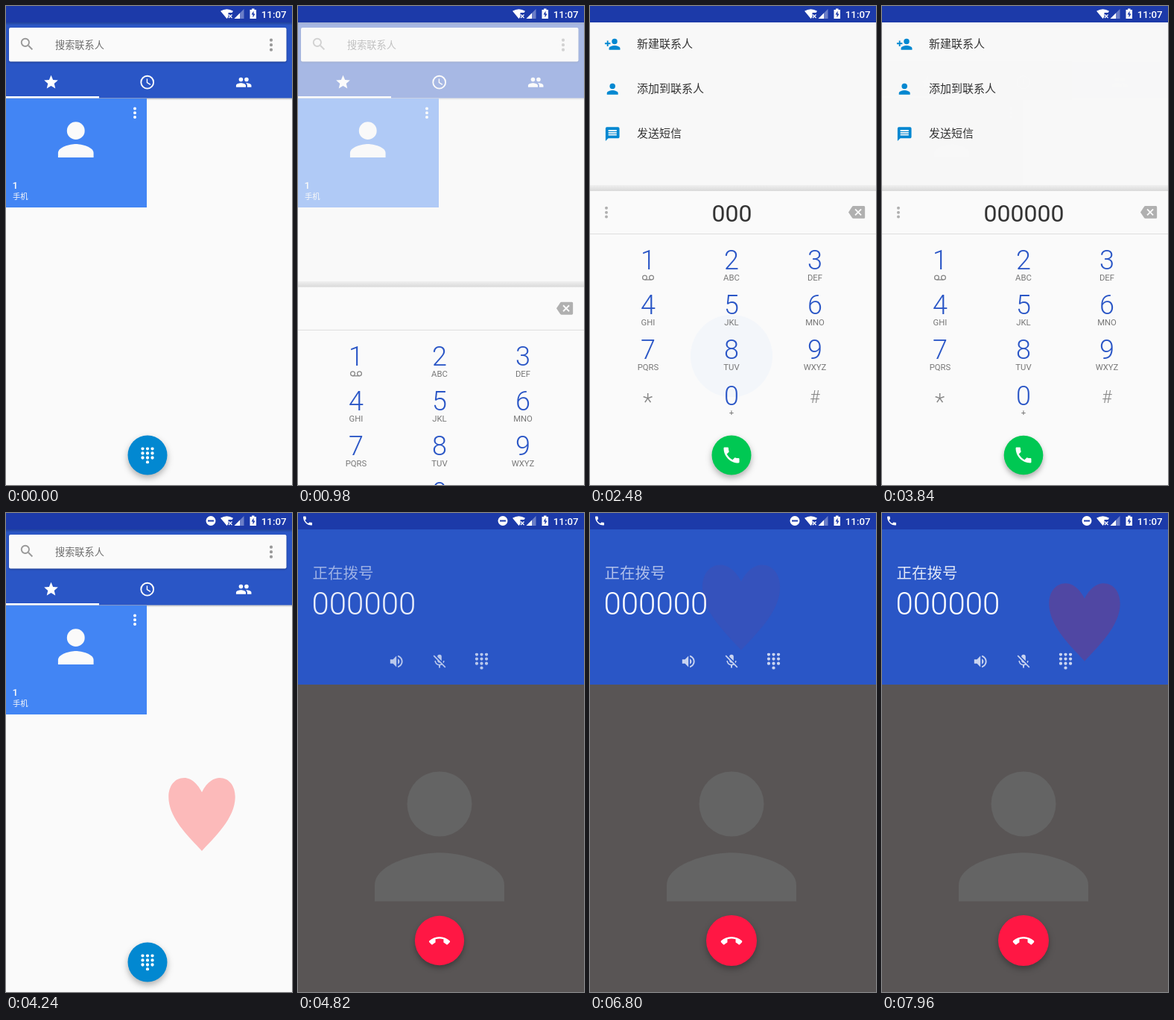
Animation of 384x642 px, one loop 8000 ms. Source, as an HTML page:

```html
<!DOCTYPE html>
<html lang="zh">
<head>
<meta charset="utf-8">
<title>Dialer</title>
<style>
html, body { margin: 0; width: 100%; height: 100%; overflow: hidden; background: #fafafa; }
svg.stage { display: block; width: 100vw; height: 100vh; }
text { font-family: Roboto, "Noto Sans CJK SC", "Noto Sans CJK", sans-serif; }
.mid { text-anchor: middle; }
.light { font-weight: 300; }
.lift { filter: drop-shadow(0 4px 4px rgba(0,0,0,.3)); }
</style>
</head>
<body>
<svg class="stage" viewBox="0 0 384 642">
<defs>
  <symbol id="star" viewBox="0 0 24 24"><path d="M12 17.27L18.18 21l-1.64-7.03L22 9.24l-7.19-.61L12 2 9.19 8.63 2 9.24l5.46 4.73L5.82 21z"/></symbol>
  <symbol id="clock" viewBox="0 0 24 24"><circle cx="12" cy="12" r="9" fill="none" stroke="#fff" stroke-width="2"/><path d="M11.7 7v5.5l4.8 2.9" fill="none" stroke="#fff" stroke-width="1.5"/></symbol>
  <symbol id="people" viewBox="0 0 24 24"><circle cx="8" cy="8" r="3"/><path d="M16 11a3 3 0 1 0 0-6 3 3 0 0 0 0 6zM8 13c-2.33 0-7 1.17-7 3.5V19h14v-2.5c0-2.33-4.67-3.5-7-3.5zm8 0c-.29 0-.62.02-.97.05 1.16.84 1.97 1.97 1.97 3.45V19h6v-2.5c0-2.33-4.67-3.5-7-3.5z"/></symbol>
  <symbol id="person" viewBox="0 0 24 24"><circle cx="12" cy="8" r="4"/><path d="M12 14c-2.67 0-8 1.34-8 4v2h16v-2c0-2.66-5.33-4-8-4z"/></symbol>
  <symbol id="add" viewBox="0 0 24 24"><circle cx="15" cy="8" r="4"/><path d="M6 10V7H4v3H1v2h3v3h2v-3h3v-2H6zm9 4c-2.67 0-8 1.34-8 4v2h16v-2c0-2.66-5.33-4-8-4z"/></symbol>
  <symbol id="chat" viewBox="0 0 24 24"><path d="M20 2H4c-1.1 0-2 .9-2 2v18l4-4h14c1.1 0 2-.9 2-2V4c0-1.1-.9-2-2-2zM6 9h12v2H6V9zm12 5H6v-2h12v2zm0-6H6V6h12v2z"/></symbol>
  <symbol id="call" viewBox="0 0 24 24"><path d="M6.62 10.79c1.44 2.83 3.76 5.14 6.59 6.59l2.2-2.2c.27-.27.67-.36 1.02-.24 1.12.37 2.33.57 3.57.57.55 0 1 .45 1 1V20c0 .55-.45 1-1 1-9.39 0-17-7.61-17-17 0-.55.45-1 1-1h3.5c.55 0 1 .45 1 1 0 1.25.2 2.45.57 3.57.11.35.03.74-.25 1.02l-2.2 2.2z"/></symbol>
  <symbol id="hangup" viewBox="0 0 24 24"><path d="M12 9c-1.6 0-3.15.25-4.6.72v3.1c0 .39-.23.74-.56.9-.98.49-1.87 1.12-2.66 1.85-.4.37-1 .37-1.41 0L.29 13.08c-.39-.39-.39-1.02 0-1.41C3.34 8.78 7.46 7 12 7s8.66 1.78 11.71 4.67c.39.39.39 1.02 0 1.42l-2.48 2.48c-.41.37-1 .37-1.41 0-.79-.74-1.69-1.36-2.67-1.85-.33-.16-.56-.5-.56-.9v-3.1C15.15 9.25 13.6 9 12 9z"/></symbol>
  <symbol id="erase" viewBox="0 0 24 24"><path d="M22 3H7c-.69 0-1.23.35-1.59.88L0 12l5.41 8.11c.36.53.9.89 1.59.89h15c1.1 0 2-.9 2-2V5c0-1.1-.9-2-2-2z"/><path d="M9.7 7.7l8.6 8.6m0-8.6l-8.6 8.6" stroke="#fafafa" stroke-width="2"/></symbol>
  <symbol id="sound" viewBox="0 0 24 24"><path d="M3 9v6h4l5 5V4L7 9H3zm13.5 3c0-1.77-1.02-3.29-2.5-4.03v8.05c1.48-.73 2.5-2.25 2.5-4.02zM14 3.23v2.06c2.89.86 5 3.54 5 6.71s-2.11 5.85-5 6.71v2.06c4.01-.91 7-4.49 7-8.77s-2.99-7.86-7-8.77z"/></symbol>
  <symbol id="mute" viewBox="0 0 24 24"><path d="M19 11h-1.7c0 .74-.16 1.43-.43 2.05l1.23 1.23c.56-.98.9-2.09.9-3.28zm-4.02.17L15 5a3 3 0 0 0-6 0v.18zM4.27 3L3 4.27l6.01 6.01V11c0 1.66 1.33 3 2.99 3l.65-.08 1.66 1.66c-.71.33-1.5.52-2.31.52-2.76 0-5.3-2.1-5.3-5.1H5c0 3.41 2.72 6.23 6 6.72V21h2v-3.28c.91-.13 1.77-.45 2.54-.9L19.73 21 21 19.73z"/></symbol>
  <symbol id="search" viewBox="0 0 24 24"><circle cx="9.5" cy="9.5" r="5.5" fill="none" stroke="#999" stroke-width="2"/><path d="M14 14l5.7 5.7" stroke="#999" stroke-width="2.2"/></symbol>
  <symbol id="pad" viewBox="0 0 24 24"><path d="M5 3h0m7 0h0m7 0h0M5 9.5h0m7 0h0m7 0h0M5 16h0m7 0h0m7 0h0M12 22.4h0" fill="none" stroke="#fff" stroke-width="4.6" stroke-linecap="round" transform="translate(0 -.7)"/></symbol>
  <path id="heart" fill="red" d="M0-12C-3-18-7-19.7-9.5-19.7C-15-19.7-18-15-18-9.5C-18 2-7 12 0 19.7C7 12 18 2 18-9.5C18-15 15-19.7 9.5-19.7C7-19.7 3-18 0-12Z"/>
  <linearGradient id="edge" x2="0" y2="1"><stop stop-color="#f0f0f0"/><stop offset="1" stop-color="#d9d9d9"/></linearGradient>
  <linearGradient id="under" x2="0" y2="1"><stop stop-color="#000" stop-opacity=".22"/><stop offset="1" stop-color="#000" stop-opacity="0"/></linearGradient>
  <clipPath id="reveal"><circle id="hole" cx="190" cy="602"/></clipPath>
</defs>

<rect width="384" height="642" fill="#fafafa"/>

<g id="home">
  <rect y="22" width="384" height="101.500" fill="#2a56c6"/>
  <rect y="22" width="384" height="4" fill="url(#under)"/>
  <rect y="123.500" width="384" height="3" fill="url(#under)"/>
  <rect x="4" y="29" width="372.500" height="45.500" rx="2" fill="#fafafa" style="filter:drop-shadow(0 1px 1px rgba(0,0,0,.3))"/>
  <use href="#search" x="17" y="40" width="22.400" height="22.400"/>
  <text x="66" y="56.500" font-size="13.200" fill="#6c6c6c">搜索联系人</text>
  <path d="M356 45.700h0m0 6.500h0m0 6.500h0" stroke="#999" stroke-width="4.200" stroke-linecap="round"/>
  <g fill="#fff">
    <use href="#star" x="49.300" y="91" width="22.400" height="22.400"/>
    <use href="#clock" x="178.500" y="91" width="22.400" height="22.400"/>
    <use href="#people" x="308" y="91" width="22.400" height="22.400"/>
    <rect y="121" width="125" height="2.500"/>
  </g>
  <rect y="124" width="189" height="146" fill="#4285f4"/>
  <g fill="#fafafa">
    <use href="#person" x="58" y="143.300" width="71.500" height="71.500"/>
    <text x="8.500" y="244.500" font-size="13.500" font-weight="500">1</text>
    <text x="9" y="259" font-size="10.300">手机</text>
  </g>
  <path d="M173 137.500h0m0 5.800h0m0 5.800h0" stroke="#fff" stroke-width="4" stroke-linecap="round"/>
</g>

<g id="fab" class="lift">
  <circle r="26.500" fill="#0288d1"/>
  <use href="#pad" x="-11.200" y="-10.800" width="22.400" height="22.400"/>
</g>

<g id="veil">
  <rect y="22" width="384" height="620" fill="#f8f8f8"/>
  <g id="menu" fill="#0288d1">
    <use href="#add" x="19" y="40" width="22.400" height="22.400"/>
    <use href="#person" x="19" y="100" width="22.400" height="22.400"/>
    <use href="#chat" x="19" y="160.500" width="22.400" height="22.400"/>
    <g font-size="15" fill="#333"><text x="63" y="56">新建联系人</text><text x="63" y="116">添加到联系人</text><text x="63" y="176">发送短信</text></g>
  </g>
</g>

<g id="sheet">
  <rect y="240" width="384" height="8" fill="url(#edge)"/>
  <rect y="248" width="384" height="394" fill="#fafafa"/>
  <rect y="305" width="384" height="1" fill="#dedede"/>
  <circle id="ripple" cx="190" cy="469" fill="#4285f4"/>
  <g id="keys"></g>
  <use href="#erase" x="347" y="265.200" width="22.400" height="22.400" fill="#b0b0b0"/>
  <path id="more" d="M22 270.800h0m0 5.900h0m0 5.900h0" stroke="#b0b0b0" stroke-width="4" stroke-linecap="round"/>
  <text id="entry" class="mid" x="190.500" y="289" font-size="32" fill="#333"></text>
</g>

<g id="dial" class="lift">
  <circle r="26.500" fill="#00c853"/>
  <use id="dialIcon" href="#call" x="-14" y="-14" width="28" height="28" fill="#fff"/>
</g>

<g id="calling" clip-path="url(#reveal)">
  <rect y="22" width="384" height="208" fill="#2a56c6"/>
  <rect y="230" width="384" height="412" fill="#595555"/>
  <use href="#person" x="59.500" y="303" width="261" height="261" fill="#646464"/>
  <g id="info" fill="#fff">
    <text id="state" x="19.500" y="88" font-size="20.500">正在拨号</text>
    <text id="number" class="light" x="18.500" y="135.500" font-size="42"></text>
    <g opacity=".75">
      <use href="#sound" x="121" y="187.800" width="22.400" height="22.400"/>
      <use href="#mute" x="178.800" y="187.800" width="22.400" height="22.400"/>
      <use href="#pad" x="235.300" y="187.400" width="22.400" height="22.400"/>
    </g>
  </g>
  <g id="end" class="lift">
    <circle r="34" fill="#ff1744"/>
    <use href="#hangup" x="-14.500" y="-13.500" width="29" height="29" fill="#fff"/>
  </g>
</g>

<g id="hearts"></g>

<g fill="#fff">
  <rect width="384" height="22" fill="#1c3aa9"/>
  <use id="ongoing" href="#call" x="5" y="2.500" width="16" height="16"/>
  <g id="quiet"><circle cx="275" cy="10.500" r="6.500"/><rect x="271" y="9.500" width="8" height="2" fill="#1c3aa9"/></g>
  <path d="M288 6.800Q296.500 1.500 305 6.800L303.500 9h-5v5.500L296.500 17z"/>
  <path d="M299 11.500l4.500 4.500m0-4.500l-4.500 4.500" stroke="#fff" stroke-width="1.300"/>
  <path d="M319.500 4v13H306.500z" opacity=".35"/><path d="M314 9.500V17H306.500z"/>
  <path d="M327.500 5h2.500V3.500h3.500V5h2.500v12h-8.500z"/><path d="M332.500 6.500l-3 5h2v4l3-5h-2z" fill="#1c3aa9"/>
  <text x="342.800" y="15.500" font-size="13.300" font-weight="500">11:07</text>
</g>
</svg>

<script>
const LOOP = 8000, NUMBER = '000000';
const TAPS = [1660, 1820, 2360, 2640, 2840, 3040];
// start time, x, y
const HEARTS = [[4210, 263, 404], [4900, 258, 405], [5520, 170, 371], [6340, 203, 233], [7940, 272, 146.5]];

const $ = id => document.getElementById(id);
const span = (t, a, b) => Math.min(1, Math.max(0, (t - a) / (b - a)));
const out = p => 1 - (1 - p) ** 3;
const inOut = p => p * p * (3 - 2 * p);
const set = (el, attrs) => { for (const k in attrs) el.setAttribute(k, attrs[k]); };
const fade = (id, a) => set($(id), { opacity: a, visibility: a > 0 ? 'visible' : 'hidden' });
const place = (el, x, y, s) => set(el, { transform: `translate(${x} ${y}) scale(${s})`, visibility: s > 0 ? 'visible' : 'hidden' });

function label(x, y, size, fill, str, cls = 'mid') {
  return `<text class="${cls}" x="${x}" y="${y}" font-size="${size}" fill="${fill}">${str}</text>`;
}

function buildKeys() {
  const letters = ['', 'ABC', 'DEF', 'GHI', 'JKL', 'MNO', 'PQRS', 'TUV', 'WXYZ'];
  let html = letters.map((word, i) => {
    const x = 78 + i % 3 * 112, y = 353 + Math.floor(i / 3) * 60;
    return label(x, y, 36, '#2a56c6', i + 1, 'mid light') + label(x, y + 15, 11.3, '#777', word);
  }).join('');
  html += label(190, 535, 36, '#2a56c6', 0, 'mid light') + label(190, 548.5, 11.3, '#777', '+');
  html += label(77.5, 541, 31, '#888', '*', 'mid light') + label(302, 532, 23, '#888', '#', 'mid light');
  html += '<g fill="none" stroke="#888" stroke-width="1.3"><circle cx="73.500" cy="364" r="2.900"/><circle cx="82.500" cy="364" r="2.900"/><path d="M73.500 366.900h9"/></g>';
  $('keys').innerHTML = html;
}

function drawHeart(el, age, x, y) {
  const pop = span(age, 0, 120), rise = span(age, 200, 475);
  const alpha = age < 0 ? 0 : pop * (1 - rise);
  set(el, {
    transform: `translate(${x} ${y - 112 * rise}) scale(${3 - 2 * pop + 2 * rise})`,
    opacity: alpha
  });
}

function draw(t) {
  const open = out(span(t, 880, 1200)), close = inOut(span(t, 3840, 4140));
  const shown = open * (1 - close);
  set($('sheet'), { transform: `translate(0 ${402 * (1 - shown)})` });
  fade('veil', span(t, 860, 1060) * (1 - span(t, 3840, 4080)));

  const back = out(span(t, 4060, 4220));
  place($('fab'), 190, 602, t < 3840 ? 1 - span(t, 860, 1020) : back);
  const grow = out(span(t, 1230, 1480)) * (1 - span(t, 3840, 4000));
  place($('dial'), 190, 602, grow);
  set($('dialIcon'), { opacity: Math.max(0, (grow - .4) / .6) });

  const typed = TAPS.filter(at => t >= at).length;
  $('entry').textContent = NUMBER.slice(0, typed);
  fade('more', typed ? span(t, 1820, 1900) : 0);
  fade('menu', span(t, 1860, 2060));
  const press = typed > 1 ? span(t, TAPS[typed - 1] - 40, TAPS[typed - 1] + 240) : 1;
  set($('ripple'), { r: 20 + 38 * out(press), opacity: .08 * (1 - press) });

  const call = span(t, 4320, 4620);
  set($('hole'), { r: 720 * inOut(call) });
  fade('calling', call > 0 ? 1 : 0);
  fade('info', span(t, 4640, 4840));
  place($('end'), 190, 573, out(span(t, 4680, 4880)));
  set($('state'), { opacity: .8 + .2 * Math.cos((t - 5680) / 1900 * 2 * Math.PI) });
  fade('ongoing', t >= 4680 ? 1 : 0);
  fade('quiet', t >= 3880 ? 1 : 0);

  HEARTS.forEach(([at, x, y], i) => drawHeart($('hearts').children[i], t - at, x, y));
}

buildKeys();
$('number').textContent = NUMBER;
$('hearts').innerHTML = HEARTS.map(() => '<use href="#heart"/>').join('');

const begin = performance.now();
function tick() {
  draw((performance.now() - begin) % LOOP);
  requestAnimationFrame(tick);
}
tick();
</script>
</body>
</html>
```
